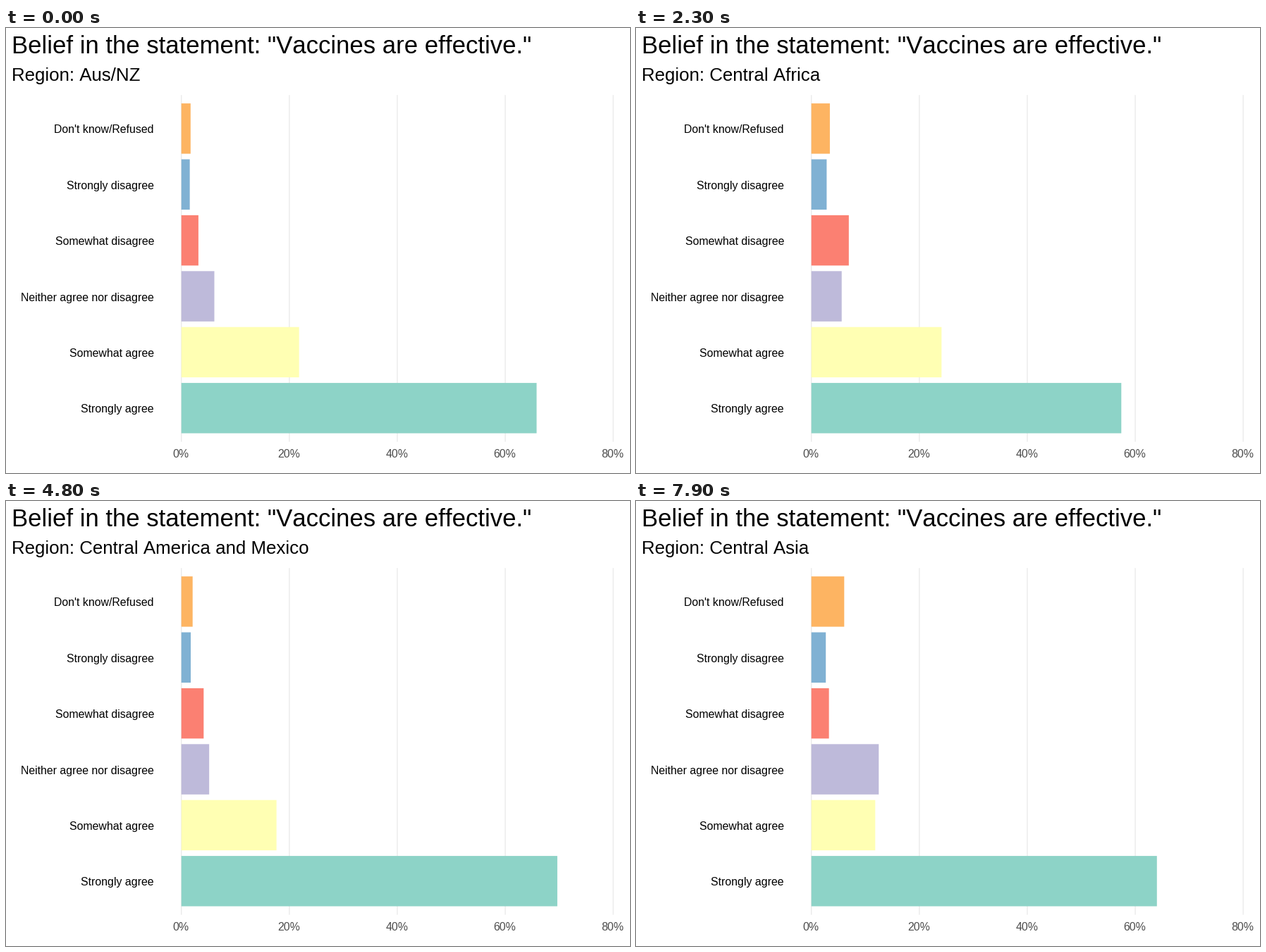
Recreate the animation shown at these times as a matplotlib script. Size 885 by 632 pixels, loop 8000 ms.

```python
import numpy as np
import matplotlib.pyplot as plt
from matplotlib.animation import FuncAnimation
from matplotlib.patches import Rectangle

W, H, DPI = 885, 632, 100
FRAMES, STEP_MS = 80, 100
FIRST, MOVE, PERIOD = 8, 18, 27  # start, length and spacing of moves, in frames

plt.rcParams.update({
    "font.family": "Liberation Sans",
    "text.hinting": "force_autohint",
    "text.kerning_factor": 20,  # practically no kerning
})

BARS = [
    ("Don't know/Refused", "#FDB462"),
    ("Strongly disagree", "#80B1D3"),
    ("Somewhat disagree", "#FB8072"),
    ("Neither agree nor disagree", "#BEBADA"),
    ("Somewhat agree", "#FFFFB3"),
    ("Strongly agree", "#8DD3C7"),
]
REGIONS = [
    ("Aus/NZ", [1.71, 1.56, 3.16, 6.11, 21.81, 65.81]),
    ("Central Africa", [3.46, 2.86, 7.01, 5.61, 24.16, 57.26]),
    ("Central America and Mexico", [1.96, 1.63, 3.86, 5.11, 17.01, 70.81]),
    ("Central Asia", [6.09, 2.68, 3.26, 12.49, 11.83, 64.01]),
]
X0, PER_CENT = 248.7, 7.656
TOP, PITCH, BAR_H = 107.1, 79.4, 71.46
GRID_W = 1.42

fig = plt.figure(figsize=(W / DPI, H / DPI), dpi=DPI, facecolor="white")
ax = fig.add_axes([0, 0, 1, 1])
ax.set_xlim(0, W)
ax.set_ylim(H, 0)
ax.axis("off")


def box(x, y, w, h, color, z):
    return ax.add_patch(Rectangle((x, y), w, h, fc=color, lw=0, zorder=z,
                                  snap=False))


def label(x, y, text, px, color="black", ha="left"):
    return ax.text(x, y, text, size=px * 72 / DPI, color=color,
                   ha=ha, va="baseline")


def ease(p):
    """Cubic in-out."""
    return 4 * p**3 if p < 0.5 else 1 - 4 * (1 - p)**3


label(8, 36, 'Belief in the statement: "Vaccines are effective."', 34.75)
subtitle = label(8.4, 75, "", 25.9)

for pct in range(0, 81, 20):
    x = X0 + pct * PER_CENT
    box(x - GRID_W / 2, 95.2, GRID_W, 492.4, "#EBEBEB", 1)
    label(x - 0.5, 609.5, f"{pct}%", 15.9, "#4D4D4D", "center")

rects = []
for i, (name, color) in enumerate(BARS):
    y = TOP + i * PITCH
    rects.append(box(X0, y, 0, BAR_H, color, 2))
    label(210, y + BAR_H / 2 + 6.5, name, 15.88, ha="right")


def update(frame):
    k, into = divmod(max(frame - FIRST, 0), PERIOD)
    p = min(into / MOVE, 1)
    (old, a), (new, b) = REGIONS[k], REGIONS[k + 1]
    subtitle.set_text("Region: " + (new if p > 0.5 else old))
    values = np.array(a) + (np.array(b) - np.array(a)) * ease(p)
    for rect, v in zip(rects, values):
        rect.set_width(v * PER_CENT)
    return [subtitle, *rects]


anim = FuncAnimation(fig, update, frames=FRAMES, interval=STEP_MS,
                     init_func=lambda: update(0), repeat=True, repeat_delay=0)
plt.show()
```
